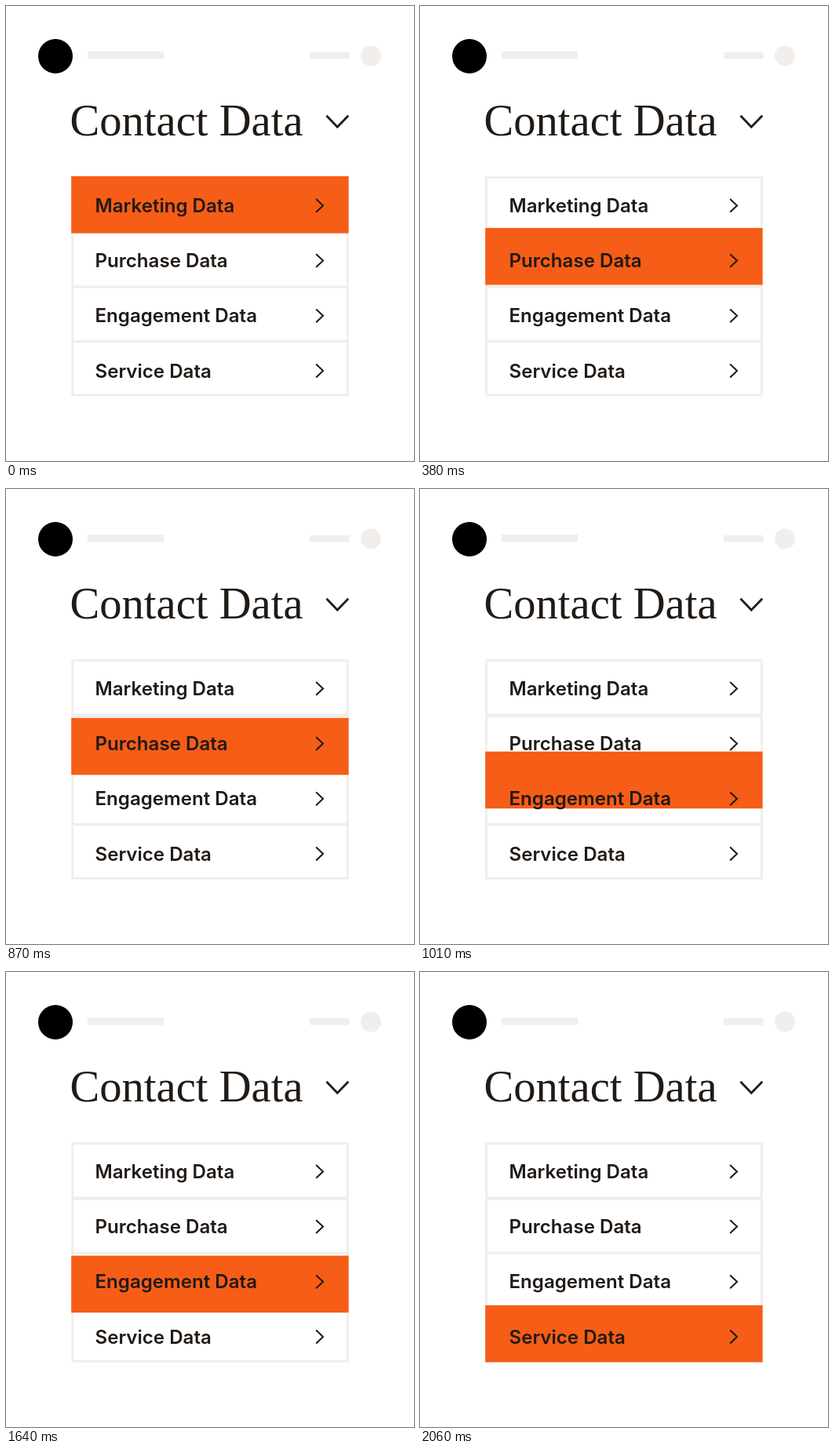
Write an HTML page that moves like this. It is 520 by 580 pixels and loops after 2200 ms.

```html
<!DOCTYPE html>
<html lang="en">
<head>
<meta charset="utf-8">
<title>Contact Data</title>
<style>
  html, body { margin: 0; width: 100%; height: 100%; overflow: hidden; background: #fff; }
  svg { display: block; width: 520px; height: 580px; }
  .title { font: 56.6px "Liberation Serif", "Times New Roman", serif; }
  .label { font: 600 24.1px Inter, sans-serif; }
</style>
</head>
<body>
<svg viewBox="0 0 520 580">
  <rect width="520" height="580" fill="#fff"/>
  <circle cx="63" cy="64" r="22" fill="#000"/>
  <g fill="#f1eeeb">
    <rect x="104" y="58" width="97" height="9.5"/>
    <rect x="387" y="59" width="50.5" height="8.5"/>
    <circle cx="465" cy="63.5" r="13"/>
  </g>
  <g fill="#211a15">
    <text class="title" x="81.5" y="165">Contact Data</text>
  </g>
  <path d="M408.5 139.8L422.3 154.3L436.3 139.8" fill="none" stroke="#211a15" stroke-width="2.8"/>
  <g fill="#efeeec">
    <path fill-rule="evenodd" d="M83.2 217.2H436.8V497.4H83.2ZM86 220V494.8H434V220Z"/>
    <rect x="84" y="286.5" width="352" height="4.5"/>
    <rect x="84" y="356.5" width="352" height="3"/>
    <rect x="84" y="425.7" width="352" height="3.5"/>
  </g>
  <rect id="bar" x="83.2" y="217" width="353.5" height="72.6" fill="#f65d17"/>
  <g id="rows"></g>
</svg>
<script>
const LOOP = 2200, STEP = 70, STEPS = 7;
const labels = ["Marketing Data", "Purchase Data", "Engagement Data", "Service Data"];
const tops = [217, 286.7, 356.6, 424.8];
const starts = [100, 870, 1640];
const bar = document.getElementById("bar");

document.getElementById("rows").innerHTML = labels.map((label, i) => {
  const y = 254.4 + i * 70.2;
  return `<text class="label" x="113.5" y="${y + 8.6}" fill="#211a15">${label}</text>
    <path d="M395.2 ${y - 8.4}l8.9 8.4l-8.9 8.4" fill="none" stroke="#211a15" stroke-width="2"/>`;
}).join("");

const bezier = (a, b, s) => 3 * (1 - s) * (1 - s) * s * a + 3 * (1 - s) * s * s * b + s * s * s;

// Cubic easing (.36, 0, .2, 1), solved by bisection
function ease(x) {
  if (x <= 0) return 0;
  if (x >= 1) return 1;
  let lo = 0, hi = 1;
  for (let i = 0; i < 24; i++) {
    const mid = (lo + hi) / 2;
    if (bezier(0.36, 0.2, mid) < x) lo = mid;
    else hi = mid;
  }
  return bezier(0, 1, lo);
}

function draw(t) {
  let y = tops[0];
  starts.forEach((start, i) => {
    const step = Math.floor((t - start) / STEP) + 1;
    y += (tops[i + 1] - tops[i]) * ease(step / STEPS);
  });
  bar.setAttribute("y", y.toFixed(2));
}

const origin = performance.now();
function tick() {
  draw((performance.now() - origin) % LOOP);
  requestAnimationFrame(tick);
}
draw(0);
requestAnimationFrame(tick);
</script>
</body>
</html>
```
